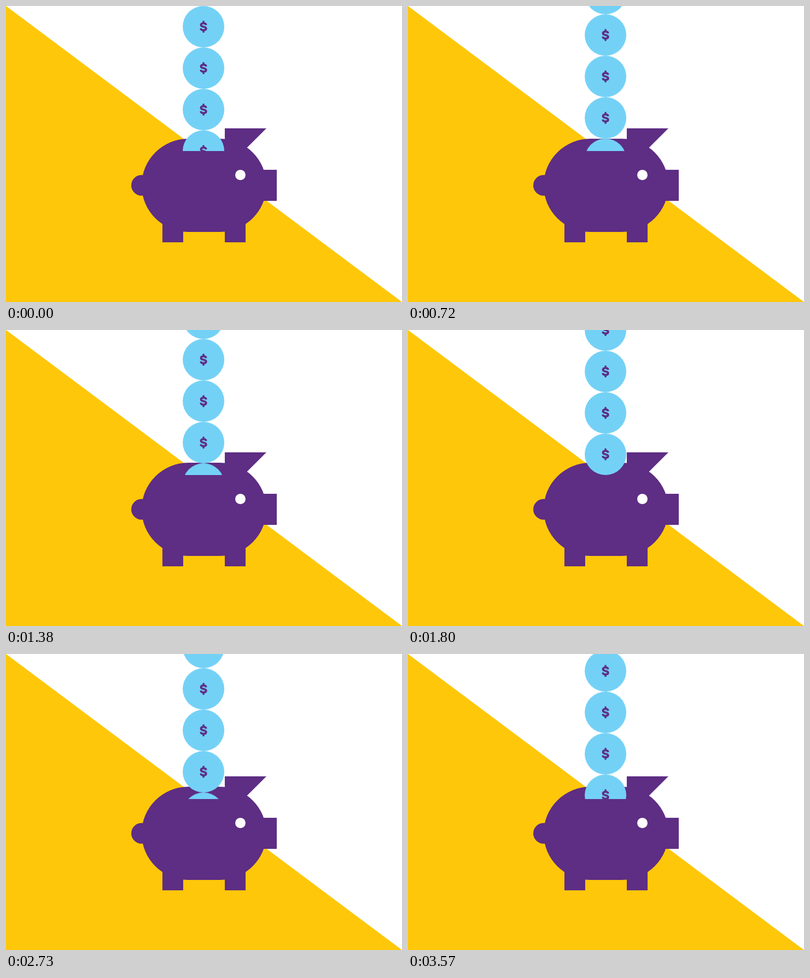
Animation, 800 px wide and 600 px high, one loop 3.6 s. Source, as an HTML page without scripts:

```html
<!DOCTYPE html>
<html lang="en">
<head>
<meta charset="utf-8">
<title>Piggy bank</title>
<style>
  html, body { margin: 0; width: 100%; height: 100%; overflow: hidden; background: #fff; }
  svg { display: block; width: 800px; height: 600px; }
  .pig { fill: #5e2d84; }
  .coin { fill: #74d1f6; }
  .dollar { fill: none; stroke: #5e2d84; stroke-width: 4.2; }
  .bar { stroke-width: 3.6; }

  /* Eleven coins drop per loop, 30 ms per step; the small delay keeps steps off the boundary. */
  .stack { animation: drop 3600ms steps(120) -1ms infinite; }
  @keyframes drop { to { transform: translateY(924px); } }
</style>
</head>
<body>
<svg viewBox="0 0 800 600" role="img" aria-label="Coins dropping into a piggy bank">
  <defs>
    <clipPath id="slot"><rect x="350" width="100" height="294"/></clipPath>
    <g id="coin">
      <circle class="coin" r="42"/>
      <path class="dollar" d="M5.5-3.4C5-5.8 3-7 0-7C-3.2-7-5.1-5.6-5.1-3.6C-5.1-1.2-2.8-.7 0 0C3.2.7 5.3 1.4 5.3 3.8C5.3 5.8 3.2 7 0 7C-3 7-5.2 5.8-5.6 3.2"/>
      <path class="dollar bar" d="M0-12V-7M0 7V12"/>
    </g>
    <g id="four">
      <use href="#coin"/>
      <use href="#coin" y="-84"/>
      <use href="#coin" y="-168"/>
      <use href="#coin" y="-252"/>
    </g>
  </defs>

  <path fill="#ffc709" d="M0 0V600H800Z"/>

  <g class="pig">
    <rect x="274" y="269" width="252" height="189" rx="94.5"/>
    <circle cx="274" cy="363.5" r="21"/>
    <path d="M442 248H526L442 332Z"/>
    <rect x="505" y="332" width="42" height="63"/>
    <rect x="316" y="416" width="42" height="63"/>
    <rect x="442" y="416" width="42" height="63"/>
  </g>
  <circle cx="473.5" cy="342.5" r="10.5" fill="#fff"/>

  <g clip-path="url(#slot)">
    <g class="stack">
      <use href="#four" x="399" y="294"/>
      <use href="#four" x="399" y="-42"/>
      <use href="#four" x="399" y="-378"/>
      <use href="#four" x="399" y="-714"/>
    </g>
  </g>
</svg>
</body>
</html>
```
